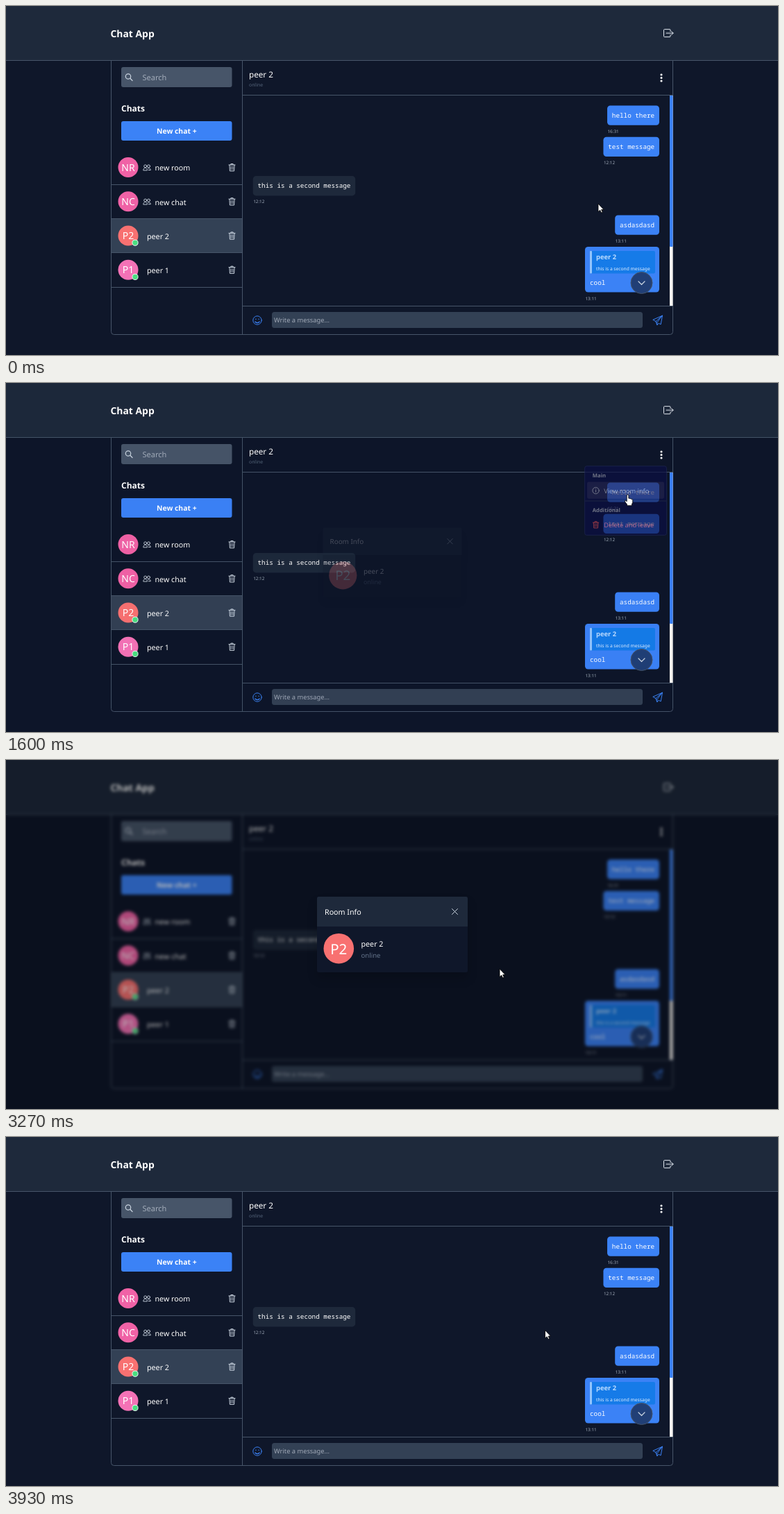
These frames come from a looping animation (1112 by 503 pixels, 4.94 s). An HTML page:

```html
<!DOCTYPE html>
<html lang="en">
<head>
<meta charset="utf-8">
<title>Chat App</title>
<style>
  html, body { margin: 0; width: 100%; height: 100%; overflow: hidden; background: #0f172a; }
  svg, #veil { position: absolute; left: 0; top: 0; width: 1112px; height: 503px; }
  #veil { background: rgba(0, 0, 0, .27); backdrop-filter: blur(2px); opacity: 0; }
  text { font-family: "Noto Sans", "Open Sans", sans-serif; fill: #fff; text-rendering: geometricPrecision; white-space: pre; }
  .mono { font: 9.3px "Noto Sans Mono", "DejaVu Sans Mono", monospace; }
  .bold { font-weight: 700; }
  .medium { font-weight: 500; }
  .mid { text-anchor: middle; }
  .row { font-size: 10.7px; font-weight: 500; }
  .time { font-size: 6.3px; fill: #a3adbb; }
  .label { font-size: 8px; font-weight: 600; fill: #a5a8ba; }
  .item { font-size: 9.55px; fill: #b9bccb; }
  .line { fill: none; stroke: #475569; }
  .icon { fill: none; stroke: #cbd5e1; stroke-linecap: round; stroke-linejoin: round; }
  .blue { fill: #3b82f6; }
  #modal { filter: drop-shadow(0 9px 7px rgba(0, 0, 0, .16)); }
</style>
</head>
<body>
<svg viewBox="0 0 1112 503">
  <defs>
    <g id="trash" class="icon">
      <path d="M-4.5-3.6h9M-1.6-3.6v-1.5h3.2v1.5M-3.6-3.4l.5 8.6h6.2l.5-8.6M-1.3-1.4v4.6M1.3-1.4v4.6"/>
    </g>
    <g id="people" class="icon" stroke-width=".9">
      <circle cx="-2.3" cy="-1.7" r="2"/>
      <circle cx="2.5" cy="-1.7" r="2"/>
      <path d="M-5.2 3.9c0-4.4 5.6-4.4 5.6 0zM1.4 1.6c1.8-1.2 3.9 0 3.9 2.3h-3"/>
    </g>
    <circle id="status" r="4.1" fill="#4ade80" stroke="#f1f5f9"/>
  </defs>

  <rect width="1112" height="503" fill="#0f172a"/>
  <rect width="1112" height="78" fill="#1e293b"/>
  <path class="line" d="M0 78.5H1112"/>
  <text class="bold" x="150.5" y="45" font-size="13.9">Chat App</text>
  <path class="icon" d="M957 36.6v-2q0-1-1-1h-7.5q-1 0-1 1v9q0 1 1 1h7.5q1 0 1-1v-2M951 39.1h10M958.6 36.7l2.6 2.4-2.6 2.4" style="stroke:#e2e8f0"/>

  <rect x="152" y="306" width="188" height="49.5" fill="#334155"/>
  <path class="line" d="M151.5 79V469.5q0 4 4 4H956.5q4 0 4-4V79M340.5 79V473M341 128.5H960M341 432.5H960"/>

  <rect x="166" y="88" width="159.5" height="29" rx="3" fill="#475569"/>
  <path class="icon" d="M179 104.5l3 3M179.7 101.5a3.7 3.7 0 1 0-7.4 0a3.7 3.7 0 1 0 7.4 0" stroke-width="1.2"/>
  <text x="196.5" y="107" font-size="11" style="fill:#a3acba">Search</text>
  <text class="bold" x="166" y="152" font-size="12">Chats</text>
  <rect class="blue" x="166" y="166" width="159.5" height="28" rx="3"/>
  <text class="bold mid" x="245.8" y="184" font-size="10.4">New chat +</text>

  <g id="rooms"></g>

  <text class="medium" x="350" y="103" font-size="11.7">peer 2</text>
  <text x="350" y="116" font-size="6.85" style="fill:#56657c">online</text>
  <path d="M944 99v9.1" stroke="#fff" stroke-width="3.1" stroke-linecap="round" stroke-dasharray="0 4.5"/>

  <rect x="956" y="129" width="4.5" height="303" fill="#f8f5f2"/>
  <rect class="blue" x="956" y="129" width="4.5" height="218" rx="1"/>

  <g id="messages"></g>
  <rect class="blue" x="834" y="347" width="107" height="65.5" rx="4.5"/>
  <rect x="841" y="353" width="94" height="32.5" rx="2" fill="#167be8"/>
  <rect x="841" y="353" width="3" height="32.5" rx="1" fill="#93c5fd"/>
  <text class="bold" x="850" y="365" font-size="9.4" style="fill:#bcdcff">peer 2</text>
  <text x="850" y="381" font-size="6.7" style="fill:#e2efff">this is a second message</text>
  <text class="mono" x="841" y="402">cool</text>
  <text class="time" x="834.5" y="423.5">13:11</text>
  <circle cx="915.5" cy="399" r="15.5" fill="#213f76" stroke="#475569"/>
  <path class="icon" d="M911 397l4.5 4.5 4.5-4.5" stroke-width="1.2"/>

  <g class="icon" style="stroke:#3b82f6">
    <circle cx="362" cy="453" r="6.2"/>
    <path d="M358.8 455q3.2 3.3 6.4 0M359.9 451v.6M364.1 451v.6" stroke-width="1.2"/>
    <path d="M945.2 446.3L931.8 452.3l4.3 2.3 1.8 5.3 2.2-2.6 2.7 1.4zL936.1 454.6M937.9 459.5v-3.6l7.3-9.6"/>
  </g>
  <rect x="383" y="441" width="534" height="23" rx="3.5" fill="#334155"/>
  <text x="386" y="456" font-size="9.3" style="fill:#a0a9b7">Write a message...</text>

  <g id="menu">
    <rect x="829.5" y="116.5" width="122" height="103" rx="3" fill="#0d1046" stroke="#232b5c"/>
    <rect id="hover" x="833" y="140" width="115" height="25" rx="2.5" fill="#252557"/>
    <path d="M830 168.5H951" stroke="#2b3156"/>
    <text class="label" x="841" y="133.5">Main</text>
    <g class="icon" stroke-width=".9" style="stroke:#b9bccb">
      <circle cx="846" cy="153" r="4.8"/>
      <path d="M846 152.3v3M846 150.4v.1"/>
    </g>
    <text class="item" x="858" y="157">View room info</text>
    <text class="label" x="841" y="185">Additional</text>
    <path class="icon" style="stroke:#e04f57" d="M841.7 200.7h8.6M844.4 200.6v-1.4h3.2v1.4M842.6 201l.5 7.8h5.8l.5-7.8M844.8 202.7v4M847.2 202.7v4"/>
    <text class="item" x="858" y="208" style="fill:#e5575f">Delete and leave</text>
  </g>
</svg>

<div id="veil"></div>

<svg viewBox="0 0 1112 503">
  <g id="modal">
    <rect x="448" y="197" width="217" height="109" rx="2.5" fill="#0f172a"/>
    <path d="M448 240v-40.5q0-2.5 2.5-2.5h212q2.5 0 2.5 2.5V240z" fill="#1e293b"/>
    <text class="medium" x="459" y="223" font-size="10.7">Room Info</text>
    <path class="icon" d="M642.5 214.5l8 8M650.5 214.5l-8 8"/>
    <circle cx="479.3" cy="271.7" r="21.8" fill="#f87171"/>
    <text class="mid medium" x="479.3" y="279.5" font-size="20.5">P2</text>
    <text class="medium" x="511.5" y="269" font-size="10.7">peer 2</text>
    <text x="511.5" y="285" font-size="9.6" style="fill:#64748b">online</text>
  </g>
  <g id="cursor" fill="#fff" stroke="#000" stroke-width=".8" stroke-linejoin="round">
    <path id="arrow" d="M0 0V11.5L2.7 9.2 4.5 13 6.3 12.2 4.6 8.5H8z"/>
    <path id="hand" d="M-1.3 1.2Q0-.8 1.3 1.2V5.6Q2.6 4.8 3.3 6 4.7 5.4 5.2 6.7 7 6.3 7.2 8V11.5L5.9 14V16H-1V14.3L-4 10.3Q-4.5 8.3-2.8 8.7L-1.3 10z"/>
  </g>
</svg>

<script>
const $ = id => document.getElementById(id);

const rooms = [
  { name: 'new room', initials: 'NR', color: '#f062a6', group: true },
  { name: 'new chat', initials: 'NC', color: '#f062a6', group: true },
  { name: 'peer 2', initials: 'P2', color: '#f87171' },
  { name: 'peer 1', initials: 'P1', color: '#f472b6' },
];
$('rooms').innerHTML = rooms.map(({ name, initials, color, group }, i) => {
  const y = 232.6 + 49.2 * i;
  return `
    <circle cx="176" cy="${y}" r="14.5" fill="${color}"/>
    <text class="mid medium" x="176" y="${y + 5.2}" font-size="14">${initials}</text>
    ${group ? `<use href="#people" x="203" y="${y}"/>` : `<use href="#status" x="186" y="${y + 10.2}"/>`}
    <text class="row" x="${group ? 214.5 : 203}" y="${y + 4.7}">${name}</text>
    <use href="#trash" x="325.5" y="${y}"/>
    <path class="line" d="M152 ${Math.floor(y + 24.9) + .5}H340"/>`;
}).join('');

const messages = [
  { body: 'hello there', time: '16:31', mine: true },
  { body: 'test message', time: '12:12', mine: true },
  { body: 'this is a second message', time: '12:12', mine: false },
  { body: 'asdasdasd', time: '13:11', mine: true },
];
let bottom = 143.5;
$('messages').innerHTML = messages.map(({ body, time, mine }, i) => {
  const speakerChanged = i > 0 && mine !== messages[i - 1].mine;
  const y = bottom + (speakerChanged ? 11.2 : 0);
  const width = body.length * 5.58 + 13.6;
  const x = mine ? 941 - width : 355.7;
  bottom = y + 45.2;
  return `
    <rect x="${x}" y="${y}" width="${width}" height="28.3" rx="4.5" fill="${mine ? '#3b82f6' : '#1e293b'}"/>
    <text class="mono" x="${x + 6.8}" y="${y + 17.2}">${body}</text>
    <text class="time" x="${x + .5}" y="${y + 39.2}">${time}</text>`;
}).join('');

const LOOP = 4940, FPS = 15;
const clamp = k => Math.min(1, Math.max(0, k));
const easeOut = k => 1 - (1 - k) ** 2;
const easeInOut = k => k * k * (3 - 2 * k);
const ramp = (time, from, to, ease) => ease(clamp((time - from) / (to - from)));
const within = (time, from, to) => time >= from && time < to;

const home = { x: 853, y: 285 };
const moves = [
  { from: 0, to: 530, x: 945.5, y: 102.7 },
  { from: 930, to: 1200, x: 897.5, y: 159.2 },
  { from: 1570, to: 2060, x: 715, y: 302 },
  { from: 3230, to: 3330, x: 702, y: 299 },
  { from: 3530, to: 3930, x: 776.5, y: 278.5 },
];

function cursorAt(time) {
  return moves.reduce((at, move) => {
    const k = ramp(time, move.from, move.to, easeInOut);
    return { x: at.x + (move.x - at.x) * k, y: at.y + (move.y - at.y) * k };
  }, home);
}

// Fades in while growing from 90 % and rising 10 px.
function pop(element, amount, x, y) {
  element.style.opacity = amount;
  element.setAttribute('transform',
    `translate(${x} ${y}) scale(${.9 + .1 * amount}) translate(${-x} ${10 * (1 - amount) - y})`);
}

const show = (element, visible) => { element.style.display = visible ? '' : 'none'; };

function draw() {
  const elapsed = (performance.now() - start) % LOOP;
  const time = Math.floor(elapsed * FPS / 1000 + .06) * 1000 / FPS;

  const { x, y } = cursorAt(time);
  const hovering = within(time, 1110, 1620);
  const pointing = hovering || within(time, 520, 960);
  $('cursor').setAttribute('transform', `translate(${x} ${y})`);
  show($('hand'), pointing);
  show($('arrow'), !pointing);
  show($('hover'), hovering);

  const menu = ramp(time, 900, 1070, easeOut) - ramp(time, 1570, 1730, easeOut);
  const modal = ramp(time, 1570, 1820, easeOut) - ramp(time, 3450, 3660, easeOut);
  const veil = ramp(time, 1570, 2000, easeInOut) - ramp(time, 3420, 3680, easeInOut);
  pop($('menu'), menu, 951, 117);
  pop($('modal'), modal, 556.5, 251.5);
  $('veil').style.opacity = veil;
  requestAnimationFrame(draw);
}

const start = performance.now();
draw();
</script>
</body>
</html>
```
